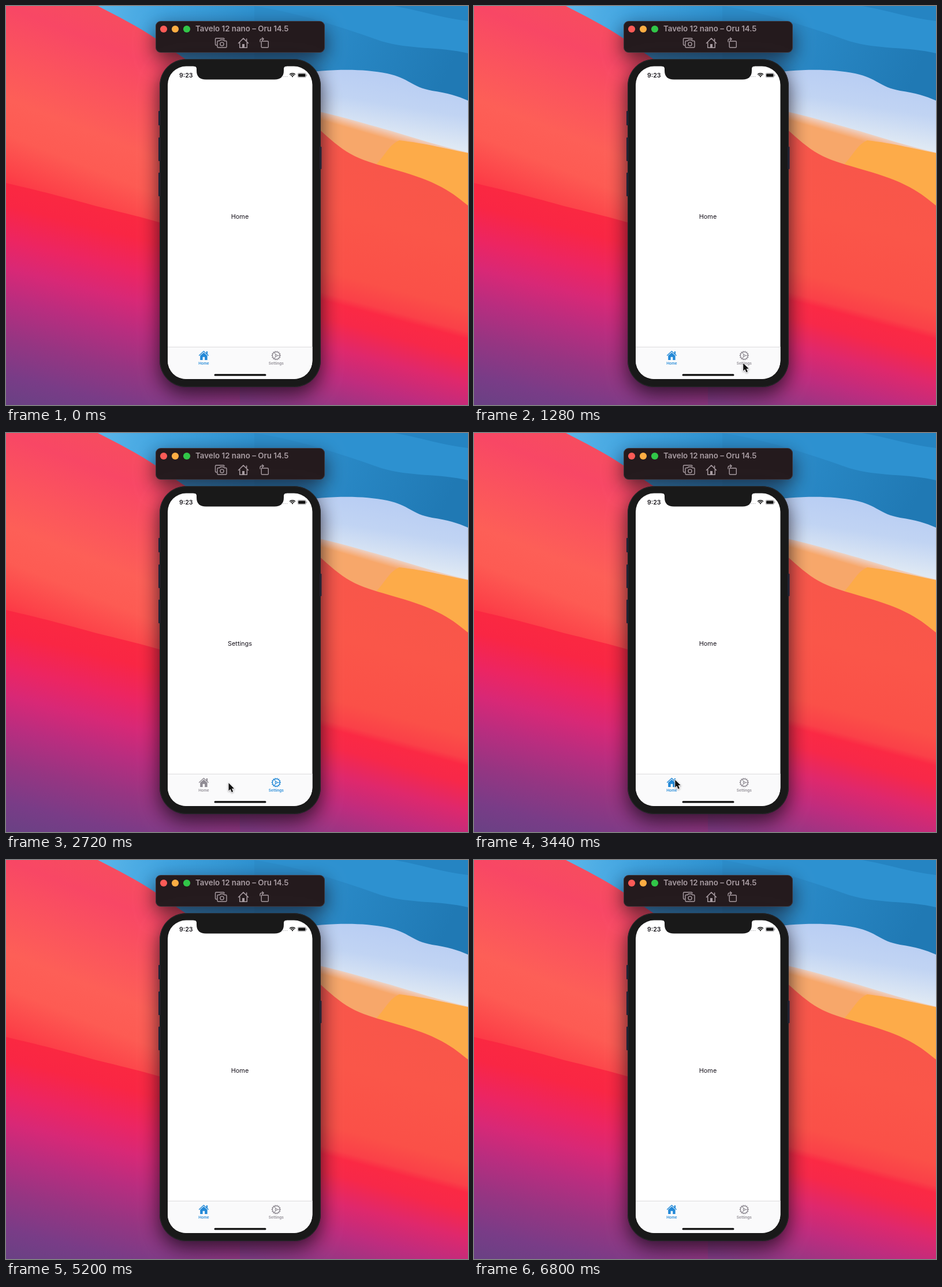
Recreate the animation shown at these times as an HTML page with a canvas. Size 800 by 692 pixels, loop 6.88 s.

```html
<!DOCTYPE html>
<html lang="en">
<head>
<meta charset="utf-8">
<title>Tab demo</title>
<style>
html, body { margin: 0; width: 100%; height: 100%; overflow: hidden; background: #111; }
canvas { display: block; width: 800px; height: 692px; }
</style>
</head>
<body>
<canvas id="stage" width="800" height="692"></canvas>
<script>
const W = 800, H = 692, LOOP = 6880, STEP = 80;
const ctx = document.getElementById('stage').getContext('2d');
const FONT = 'Inter, Roboto, "Liberation Sans", sans-serif';
const BLUE = '#2389d7', GRAY = '#8f8b93', TOOL = '#a99da3';

function shape(g, d, fill) {
  g.fillStyle = fill;
  g.fill(new Path2D(d));
}

function line(g, d, color, width) {
  g.strokeStyle = color;
  g.lineWidth = width;
  g.stroke(new Path2D(d));
}

function box(g, x, y, w, h, r, fill) {
  g.beginPath();
  g.roundRect(x, y, w, h, r);
  g.fillStyle = fill;
  g.fill();
}

function disc(g, x, y, r, fill) {
  g.beginPath();
  g.arc(x, y, r, 0, Math.PI * 2);
  g.fillStyle = fill;
  g.fill();
}

function label(g, str, x, y, font, color, align = 'center') {
  g.font = font + ' ' + FONT;
  g.fillStyle = color;
  g.textAlign = align;
  g.textBaseline = 'alphabetic';
  g.fillText(str, x, y);
}

function ramp(g, x0, y0, x1, y1, stops) {
  const grad = g.createLinearGradient(x0, y0, x1, y1);
  stops.forEach(([t, c]) => grad.addColorStop(t, c));
  return grad;
}

// Gradient whose bands fall to the right by `slope`; stops are heights at x = 0.
function slanted(g, slope, stops) {
  const a = stops[0][0], len = stops[stops.length - 1][0] - a;
  const k = len / (1 + slope * slope);
  return ramp(g, 0, a, -slope * k, a + k, stops.map(([y, c]) => [(y - a) / len, c]));
}

function wallpaper(g) {
  g.fillStyle = ramp(g, 160, 0, 420, 60, [[0, '#5cb6e9'], [.45, '#3ea2df'], [1, '#2d91d0']]);
  g.fillRect(0, 0, W, H);
  shape(g, 'M430 0 C510 12 590 40 650 61 C700 76 750 70 800 82 V170 H430 Z',
    ramp(g, 540, 30, 760, 130, [[0, '#2b8cca'], [1, '#2079b4']]));
  shape(g, 'M672 0 C715 7 750 20 800 26 V0 Z', '#2584c2');

  shape(g, 'M500 118 C560 109 615 108 660 117 C700 126 701 140 738 147 C765 151 782 156 800 164 V270 H500 Z',
    ramp(g, 640, 110, 620, 232, [[0, '#b8cdf3'], [.45, '#c1d4f3'], [1, '#e5edf4']]));
  shape(g, 'M500 176 C550 182 600 198 665 216 C710 230 760 245 800 254 V360 H500 Z',
    slanted(g, .289, [[21, '#e8dcd8'], [30, '#f3c0a2'], [40, '#f7a76a']]));
  shape(g, 'M630 285 C655 265 660 242 681 233 C725 238 770 249 800 255 V360 H700 Z', '#fdab49');
  shape(g, 'M500 178 C540 207 570 247 612 264 C650 280 710 290 754 314 C775 325 788 337 800 346 V692 H400 V300 Z',
    slanted(g, .27, [[20, '#f7564b'], [200, '#fa5649'], [310, '#fa5048'], [349, '#fa4048'],
      [362, '#fb2944'], [392, '#f72849'], [440, '#df286c'], [490, '#bf2c7e'], [570, '#833b86']]));

  // upper sweep, then the darker one below it
  shape(g, 'M0 0 H159 C190 16 230 36 260 57 C290 80 330 103 360 125 L405 300 V692 H0 Z',
    slanted(g, .4, [[-110, '#f6505a'], [0, '#f84765'], [85, '#fb545d'], [160, '#fd5f57'],
      [222, '#fd5b53'], [285, '#fc4349'], [308, '#fc3846']]));
  shape(g, 'M0 307 C70 323 120 337 160 348 C205 359 235 366 300 385 H405 V692 H0 Z',
    slanted(g, .25, [[290, '#fb2940'], [345, '#f92644'], [405, '#ec2562'], [455, '#d82876'],
      [510, '#b92d7f'], [575, '#963582'], [640, '#793c87'], [692, '#694184']]));
}

function withShadow(g, alpha, blur, dy, draw) {
  g.save();
  g.shadowColor = `rgba(15,8,20,${alpha})`;
  g.shadowBlur = blur;
  g.shadowOffsetY = dy;
  draw();
  g.restore();
}

function toolbar(g) {
  withShadow(g, .7, 34, 12, () => box(g, 259, 26, 293, 55, 9, '#241a1d'));
  g.beginPath();
  g.roundRect(259.5, 26.5, 292, 54, 8.5);
  g.strokeStyle = 'rgba(125,115,125,.3)';
  g.lineWidth = 1;
  g.stroke();
  ['#fc5b57', '#fdad43', '#31c648'].forEach((c, i) => disc(g, 273 + i * 20, 40, 6.1, c));
  label(g, 'Tavelo 12 nano – Oru 14.5', 328, 44.4, '600 13.3px', TOOL, 'left');

  g.lineJoin = g.lineCap = 'round';
  line(g, 'M365 68 H364 Q362.5 68 362.5 66.5 V57.5 Q362.5 56 364 56 H376.5 Q378 56 378 57.5', TOOL, 1.4);
  line(g, 'M367.5 60.5 H370 L371.3 58.8 H376.7 L378 60.5 H380.5 Q382 60.5 382 62 V70.5 Q382 72 380.5 72 H367.5 Q366 72 366 70.5 V62 Q366 60.5 367.5 60.5 Z', TOOL, 1.4);
  line(g, 'M377.1 66 A3.1 3.1 0 1 1 370.9 66 A3.1 3.1 0 1 1 377.1 66', TOOL, 1.4);
  line(g, 'M402.5 64.5 L411 56 L419.5 64.5 M404.7 63 V72.3 H417.3 V63 M416.6 60.5 V57', TOOL, 1.5);
  box(g, 409, 66, 4, 6.5, 0, TOOL);
  line(g, 'M443.5 61 H453 Q454.3 61 454.3 62.3 V70.7 Q454.3 72 453 72 H443.5 Q442.2 72 442.2 70.7 V62.3 Q442.2 61 443.5 61 Z', TOOL, 1.4);
  line(g, 'M440 62 V60 Q440 57.2 443 57.2 H446 M443.7 55 L446.2 57.2 L443.7 59.4', TOOL, 1.3);
}

function statusBar(g) {
  label(g, '9:23', 300, 123.6, '600 10.6px', '#17151a', 'left');
  for (let i = 0; i < 4; i++) disc(g, 478 + i * 2.9, 122.4, .65, '#a5a4a8');
  g.lineCap = 'butt';
  g.strokeStyle = '#111';
  g.lineWidth = 1.6;
  [6.9, 4.3].forEach(r => {
    g.beginPath();
    g.arc(496, 123.6, r, -Math.PI * .75, -Math.PI * .25);
    g.stroke();
  });
  shape(g, 'M496 123.8 L494.3 121.8 Q496 120.4 497.7 121.8 Z', '#111');
  g.beginPath();
  g.roundRect(505, 116.4, 14.6, 7.4, 2);
  g.strokeStyle = '#9a999d';
  g.lineWidth = .8;
  g.stroke();
  box(g, 506.1, 117.5, 12.4, 5.2, 1.2, '#111');
  box(g, 520.2, 118.8, 1, 2.6, .5, '#9a999d');
}

function phone(g) {
  withShadow(g, .78, 34, 12, () => box(g, 266, 92, 279, 569, 46, '#191919'));
  [[264, 182, 25], [264, 228, 41], [264, 289, 41], [543, 244, 39]]
    .forEach(([x, y, h]) => box(g, x, y, 3.4, h, 1, '#1c2136'));
  g.beginPath();
  g.roundRect(266.7, 92.7, 277.6, 567.6, 45);
  g.strokeStyle = '#29292d';
  g.lineWidth = 1;
  g.stroke();

  g.save();
  g.beginPath();
  g.roundRect(280, 104.5, 250.5, 542.5, 32);
  g.clip();
  g.fillStyle = '#fff';
  g.fillRect(280, 104, 251, 544);
  g.fillStyle = '#fafafb';
  g.fillRect(280, 591, 251, 57);
  g.fillStyle = '#dcdbdd';
  g.fillRect(280, 591, 251, 1);
  g.restore();
  shape(g, 'M325 103 V104.5 Q330 104.5 330 109 V112 Q330 127.5 346 127.5 H465 Q481 127.5 481 112 V109 Q481 104.5 486 104.5 V103 Z', '#191919');
  statusBar(g);
  box(g, 360.5, 638.2, 90, 3.4, 1.7, '#0c0c0c');
}

function homeIcon(color) {
  ctx.lineCap = ctx.lineJoin = 'round';
  line(ctx, 'M334.6 606 L342.4 598.8 L350.2 606', color, 1.4);
  shape(ctx, 'M346.8 599 H349 V604.4 L346.8 602.4 Z', color);
  shape(ctx, 'M336.2 606.6 L342.4 600.9 L348.6 606.6 V614 H344.2 V608.8 H340.6 V614 H336.2 Z', color);
}

function gearIcon(color) {
  ctx.save();
  ctx.translate(467.8, 606.2);
  ctx.lineCap = 'butt';
  ctx.strokeStyle = color;
  ctx.lineWidth = 1.2;
  ctx.beginPath();
  ctx.arc(0, 0, 6.4, 0, Math.PI * 2);
  ctx.stroke();
  for (let i = 0; i < 14; i++) {
    ctx.rotate(Math.PI / 7);
    box(ctx, 6.5, -.85, 1.6, 1.7, .3, color);
  }
  ctx.lineWidth = 1.1;
  for (let i = 0; i < 3; i++) {
    ctx.beginPath();
    ctx.moveTo(1.5, 0);
    ctx.lineTo(6.2, 0);
    ctx.stroke();
    ctx.rotate(Math.PI * 2 / 3);
  }
  ctx.beginPath();
  ctx.arc(0, 0, 1.6, 0, Math.PI * 2);
  ctx.stroke();
  ctx.restore();
}

function pointer(x, y) {
  ctx.save();
  ctx.translate(x, y);
  const arrow = 'M0 0 V13.4 L3 10.6 L5.3 15.8 L7.7 14.8 L5.5 9.7 H9.6 Z';
  ctx.lineJoin = 'round';
  withShadow(ctx, .4, 3, 1, () => line(ctx, arrow, '#fff', 1.8));
  shape(ctx, arrow, '#111');
  ctx.restore();
}

// Pointer path: time, x, y
const path = [
  [640, 520, 700], [1200, 466.2, 619.4], [2320, 466.2, 619.4],
  [2960, 348.2, 601.4], [3680, 348.2, 601.4], [4240, 250, 700]
];
const TO_SETTINGS = 1680, TO_HOME = 3200;
const ease = u => u * u * (3 - 2 * u);

function pointerAt(t) {
  for (let i = 1; i < path.length; i++) {
    const [t0, x0, y0] = path[i - 1], [t1, x1, y1] = path[i];
    if (t >= t0 && t < t1) {
      const k = ease((t - t0) / (t1 - t0));
      return [x0 + (x1 - x0) * k, y0 + (y1 - y0) * k];
    }
  }
  return null;
}

const backdrop = document.createElement('canvas');
backdrop.width = W;
backdrop.height = H;
const bg = backdrop.getContext('2d');
wallpaper(bg);
toolbar(bg);
phone(bg);

function draw(t) {
  const settings = t >= TO_SETTINGS && t < TO_HOME;
  const homeColor = settings ? GRAY : BLUE, gearColor = settings ? BLUE : GRAY;
  ctx.drawImage(backdrop, 0, 0);
  label(ctx, settings ? 'Settings' : 'Home', 405, 368.8, '400 10.9px', '#17131c');
  homeIcon(homeColor);
  gearIcon(gearColor);
  label(ctx, 'Home', 342.4, 621.6, '600 6.5px', homeColor);
  label(ctx, 'Settings', 467.8, 621.6, '600 6.5px', gearColor);
  const p = pointerAt(t);
  if (p) pointer(...p);
}

const start = performance.now();
function tick() {
  const t = (performance.now() - start) % LOOP;
  draw(Math.floor(t / STEP) * STEP);
  requestAnimationFrame(tick);
}
tick();
</script>
</body>
</html>
```
